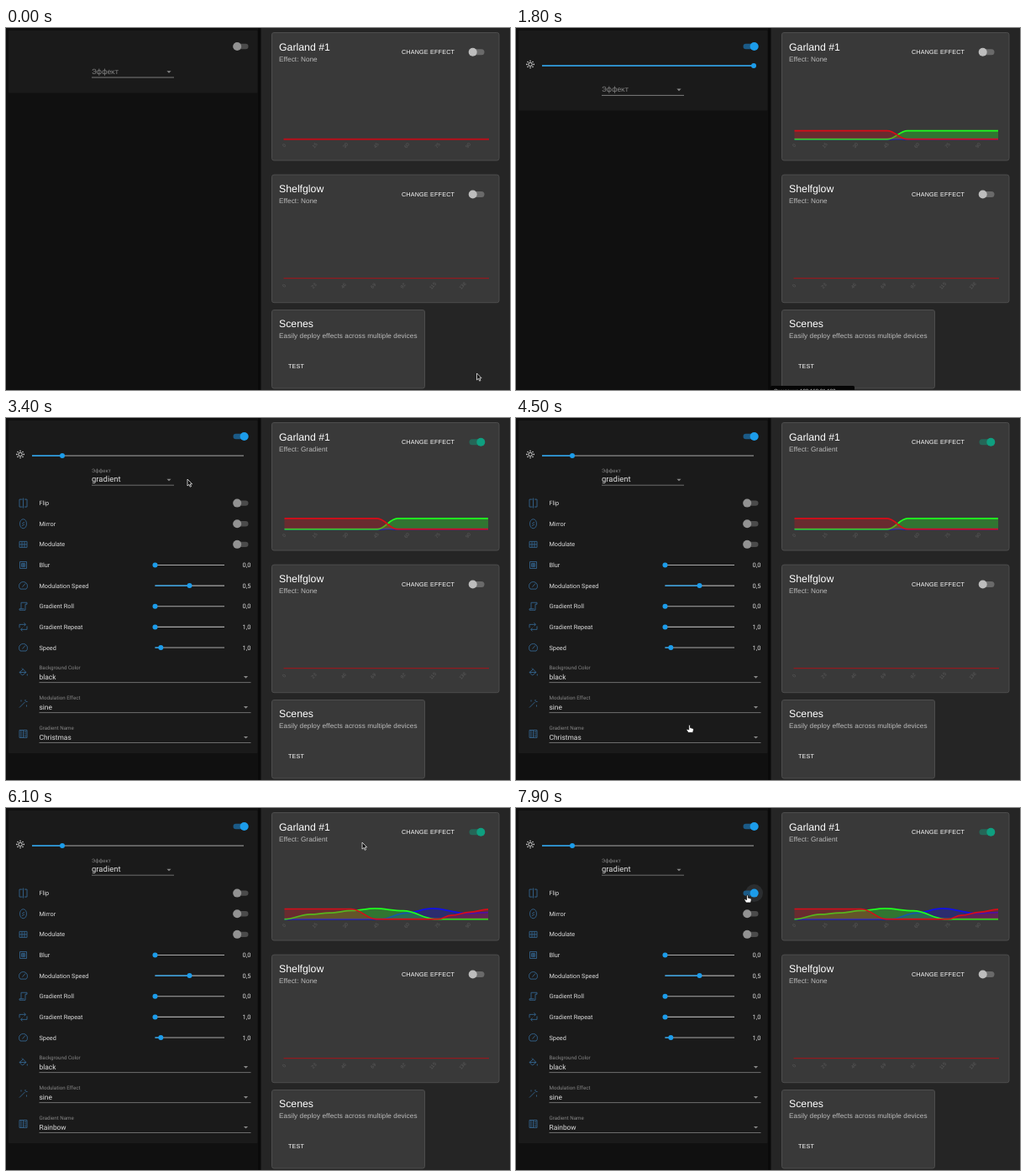
An HTML page that plays this animation: 600 by 432 pixels, repeating every 8000 ms.

```html
<!DOCTYPE html>
<html lang="en">
<head>
<meta charset="utf-8">
<title>LED control panel</title>
<style>
html, body { margin: 0; width: 100%; height: 100%; overflow: hidden; background: #101010; }
svg { display: block; width: 600px; height: 432px; }
text { font-family: Roboto, sans-serif; white-space: pre; text-rendering: geometricPrecision; }
.mui { font-family: "Liberation Sans", Arial, sans-serif; }
.icon { fill: none; stroke: #34658f; stroke-width: .9; }
</style>
</head>
<body>
<svg id="stage" viewBox="0 0 600 432"></svg>
<script>
const LOOP = 8000, BLUE = '#1c9cea';
const stage = document.getElementById('stage');

const clamp = v => Math.max(0, Math.min(1, v));
const ramp = (t, a, b) => clamp((t - a) / (b - a));
const ease = v => v * v * (3 - 2 * v);
const mix = (a, b, v) => a + (b - a) * v;
const between = (t, a, b) => t >= a && t < b;

// SVG helpers
const rect = (x, y, w, h, fill, r = 0, more = '') =>
  `<rect x="${x}" y="${y}" width="${w}" height="${h}" rx="${r}" fill="${fill}" ${more}/>`;
const dot = (x, y, r, fill) => `<circle cx="${x}" cy="${y}" r="${r}" fill="${fill}"/>`;
const path = (d, more) => `<path d="${d}" ${more}/>`;
const line = (x1, x2, y, color, w = 1) => path(`M${x1} ${y}H${x2}`, `stroke="${color}" stroke-width="${w}"`);
const text = (x, y, s, size, fill, more = '') =>
  `<text x="${x}" y="${y}" font-size="${size}" fill="${fill}" ${more}>${s}</text>`;
const mui = (x, y, s, size, fill, spacing = 0) =>
  text(x, y, s, size, fill, `class="mui" letter-spacing="${spacing * size}"`);

// Left side: control card
function toggle(y, on) {
  return rect(270.5, y - 3.2, 18, 6.4, on > .5 ? '#1b5a86' : '#4b4b4b', 3.2) +
    dot(mix(275.2, 283.6, on), y, 5, on > .5 ? BLUE : '#929292');
}

function slider(x1, x2, y, x, r = 3) {
  return line(x1, x2, y, '#aaa', 1.1) + line(x1, x, y, BLUE, 1.3) + dot(x, y, r, BLUE);
}

const chevron = (x, y) => path(`M${x - 2.6} ${y - 1.2}h5.2l-2.6 2.6z`, 'fill="#888"');

function field(x1, x2, y, label, value, size = 8.4) {
  return (label ? text(x1, y - 8.4, label, 6.2, '#858585') : '') +
    text(x1, y + 3, value, size, '#e0e0e0') +
    line(x1, x2, y + 6.8, '#777', .9) + chevron(x2 - 6, y + .5);
}

const ICONS = {
  flip: 'M-1 -4.5H-4.5V4.5H-1M0 -6V6M1.5 -4.5H4.5V4.5H1.5',
  mirror: 'M0 -5.5C5.3 -5.5 5.3 5.5 0 5.5S-5.3 -5.5 0 -5.5M-1.5 0L1.5 -2M-1.5 2.5L1.5 .5',
  grid: 'M-4.5 -3.5h9v7h-9zM-1.5 -3.5v7M1.5 -3.5v7M-4.5 0h9',
  blur: 'M-4 -4h8v8h-8zM-2 -2h4v4h-4zM-2 0h4M0 -2v4',
  gauge: 'M-3.5 4A5 5 0 1 1 3.5 4zM-1 1.5L2.5 -2.5',
  scroll: 'M-2.5 3V-4.5H4.5V-2.5H2.5V4.5H-4.5V3H1',
  repeat: 'M-4.5 1V-3H2.5M1 -5l2 2l-2 2M4.5 -1V3H-2.5M-1 1l-2 2l2 2',
  bucket: 'M-1.5 -4.5L3.5 .5L-1 4L-4.5 .5L0 -3.2M-4.5 .5H3.5M4.8 2.5v2',
  wand: 'M-4.5 4.5L2 -2M2.5 -5v2M5 -2.5h-2M-2.5 -4.5v2M4 1.5v2',
  shades: 'M-4.5 -4.5h9v9h-9zM0 -4.5v9M1 -2.5h3M1 0h3M1 2.5h3M-2.5 -4.5v9',
};
const icon = (name, y) => path(ICONS[name], `class="icon" transform="translate(20.5 ${y})"`);

const ROWS = [
  ['flip', 'Flip'], ['mirror', 'Mirror'], ['grid', 'Modulate'],
  ['blur', 'Blur', 177.5, '0,0'], ['gauge', 'Modulation Speed', 218.5, '0,5'],
  ['scroll', 'Gradient Roll', 177.5, '0,0'], ['repeat', 'Gradient Repeat', 177.5, '1,0'],
  ['gauge', 'Speed', 184.3, '1,0'],
];

function settings(t) {
  const flip = ease(ramp(t, 7700, 7850));
  const rows = ROWS.map(([ico, name, x, value], i) => {
    const y = 101.6 + i * 24.63;
    return icon(ico, y) + text(39.5, y + 2.6, name, 7.3, '#dcdcdc') + (value
      ? slider(177.5, 260, y, x) + text(291.5, y + 2.6, value, 7.5, '#dcdcdc', 'text-anchor="end"')
      : (i ? '' : dot(283.5, y, 10.5 * flip, '#2b2d2f')) + toggle(y, i ? 0 : flip));
  });
  return rows.join('') +
    icon('bucket', 303) + field(39.5, 291.5, 308.8, 'Background Color', 'black') +
    icon('wand', 341) + field(39.5, 291.5, 344.8, 'Modulation Effect', 'sine') +
    icon('shades', 377) + field(39.5, 291.5, 380.7, 'Gradient Name', t < 5500 ? 'Christmas' : 'Rainbow');
}

function sun(x, y) {
  let s = `<circle cx="${x}" cy="${y}" r="2.2" fill="none" stroke="#ddd"/>`;
  for (let i = 0; i < 8; i++) {
    const a = i * Math.PI / 4;
    s += dot(x + 4.2 * Math.cos(a), y + 4.2 * Math.sin(a), .8, '#ddd');
  }
  return s;
}

const EFFECTS = ['gradient', 'scroll', 'spectrum', 'wavelength', 'rainbow', 'strobe', 'energy', 'singleColor',
  'beat', 'blocks', 'equalizer', 'fade', 'magnitude', 'multibar', 'power'];
const GRADIENTS = ['Rainbow', 'Dancefloor', 'Plasma', 'Ocean', 'Viridis', 'Jungle', 'Spring', 'Winter', 'Frost',
  'Sunset', 'Borealis', 'Rust', 'Christmas'];

function menu(x, y, items, scroll) {
  return `<clipPath id="list"><rect x="${x}" y="${y}" width="120" height="${432 - y}"/></clipPath>` +
    `<g clip-path="url(#list)">` + rect(x, y, 120, 432 - y, '#131313') +
    items.map((s, i) => text(x + 8.5, y + 12.6 + i * 24.6 - scroll, s, 8.4, '#e0e0e0')).join('') + '</g>';
}

function gradientMenu(t) {
  const up = ease(ramp(t, 5250, 5450));
  return menu(172, 362, GRADIENTS, mix(9 * 24.6, 0, up)) + rect(286.5, mix(413, 365, up), 3.6, 12, '#8a8a8a', 1.8);
}

function left(t) {
  const on = t >= 1150, loaded = t >= 3100;
  const y = on ? 73.4 : 52;
  let s = rect(0, 0, 304, 432, '#101010') +
    rect(3, 3, 296.5, loaded ? 397 : on ? 95.5 : 74.5, '#1a1a1a', 1) +
    toggle(22, ease(ramp(t, 1050, 1180)));
  if (on) s += sun(17, 43.4) + slider(31, 283, 45, mix(283, 67, ease(ramp(t, 2220, 2450))));
  s += t < 2780
    ? text(102, y + 3, 'Эффект', 8.7, '#858585') + line(102, 200, y + 7, '#888', .9) + chevron(194, y + .4)
    : field(102, 200, y, 'Эффект', 'gradient', 9.5);
  if (loaded) s += settings(t);
  if (between(t, 2620, 2780)) s += menu(102, 61, EFFECTS, 0);
  if (between(t, 4600, 5520)) s += gradientMenu(t);
  return s;
}

// Right side: device cards
const card = (y, w, h) => rect(316.5, y, w, h, '#393939', 2.5, 'stroke="#4d4d4d"');

function device(y, name, effect, on, step, labelY) {
  let s = card(y, 270.5, 152.5) + mui(325, y + 21, name, 12.3, '#fff') +
    mui(325, y + 34, 'Effect: ' + effect, 8.19, '#bcbcbc', .0094) +
    mui(471, y + 25.8, 'CHANGE EFFECT', 7.17, '#fff', .0286) +
    rect(551.5, y + 19.8, 18, 7, on ? '#256657' : '#6a6a6a', 3.5) +
    dot(on ? 565.3 : 555.7, y + 23.3, 5, on ? '#0f9f80' : '#bdbdbd');
  for (let i = 0; i < 7; i++) {
    const x = 331 + i * (step === 15 ? 36.5 : 35.4);
    s += text(x, labelY + 2, i * step, 5.6, '#5c5c5c',
      `class="mui" text-anchor="middle" transform="rotate(-48 ${x} ${labelY})"`);
  }
  return s;
}

const BASE = 132.7, X1 = 331.5, X2 = 574;

// Heights above the axis, joined by eased segments
const TWO_TONE = [
  [[X1, 0], [448, 0], [455, .5], [463, 0], [X2, 0]],
  [[X1, 0], [442, 0], [466, 12.8], [X2, 12.8]],
  [[X1, 12.8], [442, 12.8], [466, 0], [X2, 0]],
];
const RAINBOW = [
  [[X1, 0], [446, 0], [476, 7.3], [507, 12.8], [550, 6.8], [X2, 8.2]],
  [[X1, 0], [362, 5.8], [385, 7.5], [412, 10.3], [439, 12.8], [473, 10], [512, 0], [X2, 0]],
  [[X1, 12.2], [411, 12.2], [441, 0], [514, 0], [530, 4.5], [552, 8.3], [X2, 11.8]],
];
const COLORS = ['#1010e8', '#1fff1f', '#d80c18'];

function curve(points, k) {
  const at = ([x, h]) => [x, +(BASE - h * k).toFixed(2)];
  return points.map((p, i) => {
    const [x, y] = at(p);
    if (!i) return `M${x} ${y}`;
    const [px, py] = at(points[i - 1]), m = (x - px) * .38;
    return `C${px + m} ${py} ${x - m} ${y} ${x} ${y}`;
  }).join('');
}

function chart(t) {
  const k = t < 1900 ? ramp(t, 1480, 1885) : ramp(t, 3100, 3250);
  if (!k) return line(X1 - 1, X2 + 1, BASE, '#b80f1a', 2);
  const sets = t < 5850 ? TWO_TONE : RAINBOW;
  return sets.map((points, i) => {
    const d = curve(points, k);
    return path(`${d}V${BASE}H${X1}z`, `fill="${COLORS[i]}" fill-opacity=".3"`) +
      path(d, `fill="none" stroke="${COLORS[i]}" stroke-width="1.7"`);
  }).join('');
}

function right(t) {
  let s = rect(300, 0, 4, 432, '#0a0a0a') + rect(303.5, 0, 297, 432, '#252525');
  if (!between(t, 1880, 1990)) {
    const on = t >= 1990;
    s += device(5.5, 'Garland #1', on ? 'Gradient' : 'None', on, 15, 140) + chart(t) +
      device(175.2, 'Shelfglow', 'None', false, 23, 307.5) + line(X1 - 1, X2 + 1, 298.6, '#911a20', 1.1) +
      card(336.5, 182, 93.5) + mui(325, 357.3, 'Scenes', 12.3, '#fff') +
      mui(325, 370, 'Easily deploy effects across multiple devices', 8.19, '#bcbcbc', .0094) +
      mui(336, 406, 'TEST', 7.17, '#fff', .0286);
  }
  if (between(t, 1600, 2300)) {
    s += rect(303, 427, 100, 8, '#050505', 1.5) + mui(307, 434.5, 'Ожидание 192.168.31.122…', 6.1, '#ddd');
  }
  return s;
}

// Pointer: time, x, y
const MOVES = [
  [0, 560.5, 412], [200, 560.5, 412], [1000, 279, 22], [1180, 279, 22], [1500, 300, -16], [2000, 300, -16],
  [2200, 283, 45], [2240, 283, 45], [2450, 67, 45], [2600, 180, 74], [2800, 216, 73], [3420, 216, 73],
  [3800, 450, 60], [4050, 445, 20], [4550, 200, 376], [4800, 204, 393], [5240, 204, 393], [5450, 204, 371],
  [5540, 204, 371], [5780, 455, 30], [5950, 455, 30], [6700, 161, 135], [6950, 161, 135], [7250, 170, 205],
  [7600, 275.5, 104], [LOOP, 275.5, 104],
];
const HAND = [[950, 1250], [2150, 2850], [4500, 5620], [7550, LOOP]];

function pointer(t) {
  const i = MOVES.findIndex(m => m[0] > t);
  const [t1, x1, y1] = MOVES[i - 1], [t2, x2, y2] = MOVES[i];
  const v = ease(ramp(t, t1, t2));
  const at = `transform="translate(${mix(x1, x2, v)} ${mix(y1, y2, v)})" stroke-linejoin="round" stroke-width=".8"`;
  return HAND.some(([a, b]) => between(t, a, b))
    ? path('M-.9 .4Q0 -.6 .9 .4V3.2L4 4Q5 4.4 4.7 6L4 9H-1.6L-3.8 5.5Q-3.2 4.2 -.9 5.6z', `fill="#fff" stroke="#111" ${at}`)
    : path('M0 0V8L1.9 6.3L3.2 9.2L4.5 8.6L3.2 5.8H5.6z', `fill="#0a0a0a" stroke="#eee" ${at}`);
}

function frame(now) {
  const t = now % LOOP;
  stage.innerHTML = left(t) + right(t) + pointer(t);
  requestAnimationFrame(frame);
}
requestAnimationFrame(frame);
</script>
</body>
</html>
```
